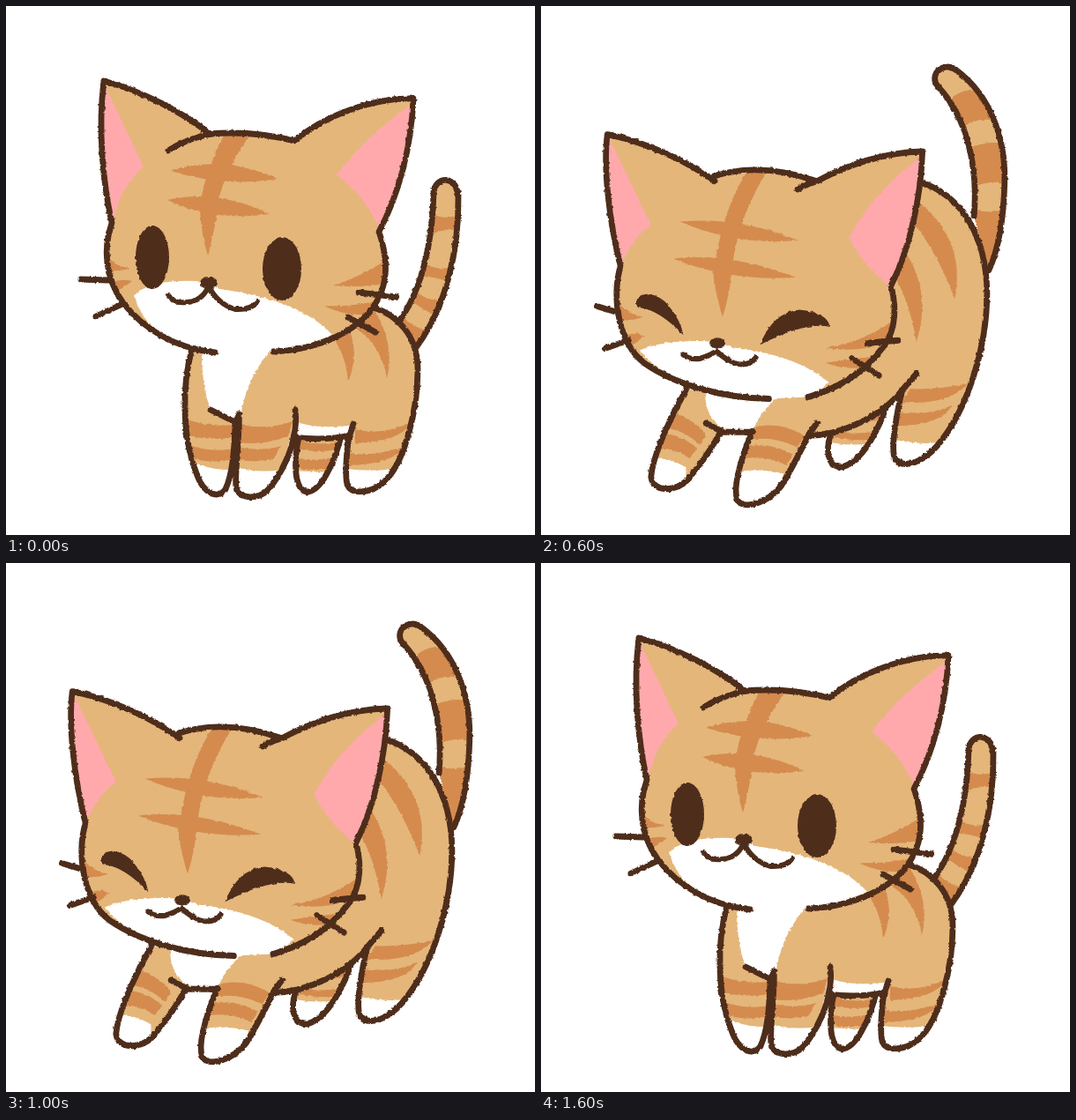
An HTML page with a canvas that plays this animation: 600x600 px, repeating every 2.1 s.

```html
<!DOCTYPE html>
<html lang="en">
<head>
<meta charset="utf-8">
<title>Stretching kitten</title>
<style>
  html, body { margin: 0; width: 100%; height: 100%; overflow: hidden; background: #fff; }
  canvas { display: block; filter: url(#rough); }
  svg { position: absolute; }
</style>
</head>
<body>
<svg width="0" height="0">
  <filter id="rough" filterUnits="userSpaceOnUse" x="0" y="0" width="600" height="600" color-interpolation-filters="sRGB">
    <feTurbulence type="fractalNoise" baseFrequency=".25" numOctaves="2" seed="4"/>
    <feDisplacementMap in="SourceGraphic" scale="3" xChannelSelector="R" yChannelSelector="G"/>
  </filter>
</svg>
<canvas id="stage" width="600" height="600"></canvas>
<script>
const ctx = document.getElementById('stage').getContext('2d');
const FUR = '#e4b67a', STRIPE = '#d58b4e', PINK = '#ffa9ac', WHITE = '#fff', INK = '#4e2d1b';

// Subpaths are filled one by one, so crossing stripes leave no holes.
function paint(color, d) {
  ctx.fillStyle = color;
  for (const sub of d.split('Z')) ctx.fill(new Path2D(sub));
}

function line(d, width = 6.8) {
  ctx.strokeStyle = INK;
  ctx.lineWidth = width;
  ctx.stroke(new Path2D(d));
}

// Furry shape with markings clipped to it, outlined on top.
function part(d, { stripe = '', white = '', pink = '' }) {
  paint(FUR, d);
  ctx.save();
  ctx.clip(new Path2D(d));
  paint(STRIPE, stripe);
  paint(WHITE, white);
  paint(PINK, pink);
  ctx.restore();
  line(d);
}

function oval(x, y, rx, ry) {
  ctx.beginPath();
  ctx.ellipse(x, y, rx, ry, 0, 0, 7);
  ctx.fillStyle = INK;
  ctx.fill();
}

function stand() {
  part('M446 357C470 325 484 270 485 212C487 192 511 192 513 215C514 275 500 340 466 386', {
    stripe: 'M482 235Q498 244 514 236L512 255Q497 251 479 261ZM476 293Q490 300 507 296L502 313Q486 306 470 307Z' +
      'M462 321Q476 336 497 333L489 351Q472 345 457 332ZM449 350Q460 366 482 368L466 388L445 358Z'
  });
  part('M332 488C326 520 327 548 341 551C356 552 372 520 380 488', {
    stripe: 'M328 491Q350 500 382 494L376 503Q350 508 328 501ZM327 512Q350 517 372 512L366 525Q345 528 327 523Z',
    white: 'M325 527L370 529V560H325Z'
  });
  part('M211 389C199 430 200 490 216 530C224 554 241 560 249 548C257 530 259 505 260 474L264 463' +
    'C265 495 259 530 261 546C265 561 287 559 297 549C315 528 325 500 326 489C350 492 372 491 389 487' +
    'C386 510 384 530 387 543C392 555 412 552 425 543C455 520 467 450 467 412C467 375 445 350 414 341', {
    stripe: 'M203 468Q228 478 259 475V489Q230 494 204 486ZM206 497Q230 507 258 502V514Q232 520 209 512Z' +
      'M264 474Q295 482 325 471L320 488Q290 499 264 495ZM263 500Q288 506 312 499L304 513Q280 519 262 514Z' +
      'M396 480Q425 488 460 472Q448 494 396 496ZM388 507Q415 512 454 499Q438 520 388 521Z' +
      'M362 366Q385 388 388 426Q402 395 387 360ZM388 360Q425 380 432 422Q442 385 417 343Z',
    white: 'M222 388C222 420 226 445 233 458L266 472C268 440 282 410 303 388Z' +
      'M326 470Q345 480 390 476V500H320ZM205 513Q230 528 260 526V565H205Z' +
      'M260 524Q285 530 318 526V565H255ZM380 524Q415 530 455 523V560H380Z'
  });
  line('M232 458L262 473M264 463V480M328 458Q330 474 326 489M394 474L389 490');
  part('M237 393C190 388 155 365 133 337C112 308 110 275 120 246C110 200 104 140 111 85' +
    'C155 97 200 120 231 145Q280 141 327 153C360 125 415 104 462 105C460 160 445 215 423 256' +
    'C438 300 430 330 405 355C380 378 340 391 303 392', {
    stripe: 'M248 145Q222 195 220 232Q222 262 229 283Q238 250 240 225Q248 185 278 145Z' +
      'M187 187Q245 168 308 196Q245 206 187 187ZM183 220Q240 207 299 236Q235 245 183 220Z' +
      'M117 286Q125 296 141 297Q128 302 110 300ZM112 317Q128 308 143 312Q132 321 120 326Z' +
      'M371 317Q400 308 432 288V315Q395 320 371 317ZM360 340Q395 342 430 332L412 350Q385 352 360 340Z',
    white: 'M145 328Q165 310 215 312Q235 314 243 321Q335 334 370 373L300 400H235Q160 380 145 328Z',
    pink: 'M112 90L156 182Q130 205 121 246C110 200 106 130 112 90ZM459 112Q405 150 375 192Q405 212 424 254C442 215 457 165 459 112Z'
  });
  paint(WHITE, 'M243 386H297V396H243Z');
  line('M184 164Q205 150 234 145');
  oval(166, 285, 19, 36);
  oval(313, 298, 22, 36);
  oval(230, 314, 10, 7);
  line('M184 328Q190 338 205 336Q222 335 230 318Q240 338 260 344Q277 345 285 336', 6);
  line('M85 310L116 311M102 352L130 339M400 325L443 330M388 353L419 370');
}

function lean() {
  part('M487 300C500 260 511 200 507 142C508 117 532 117 538 138C551 200 542 285 512 342', {
    stripe: 'M507 170Q528 159 548 167V207Q528 200 505 208ZM504 229Q522 240 540 234L535 266Q515 254 498 262Z' +
      'M493 283Q508 296 527 293L517 320Q500 312 486 302Z'
  });
  part('M332 475C326 500 325 528 343 530C365 530 380 500 389 470', {
    stripe: 'M330 477Q358 486 388 477L382 487Q355 490 330 485ZM328 491Q350 496 378 491L371 499Q350 503 328 499Z',
    white: 'M320 505L375 507V540H320Z'
  });
  paint(FUR, 'M173 424H330L300 480L214 464L174 448Z');
  part('M173 424C160 460 145 510 144 538C148 552 168 550 180 538C197 520 213 490 214 462', {
    stripe: 'M167 453Q180 468 207 473Q185 482 162 472ZM158 485Q178 495 204 492L196 503Q175 503 156 496Z',
    white: 'M145 509Q165 517 194 516V555H140Z'
  });
  paint(WHITE, 'M174 420Q188 450 208 460L240 473Q242 440 251 415Z');
  part('M238 474C230 500 220 530 223 552C229 566 256 564 270 550C295 525 307 490 309 476' +
    'C350 481 390 474 421 457C412 485 403 515 409 526C420 536 445 528 458 513' +
    'C483 483 504 410 505 350C505 300 465 254 408 252', {
    stripe: 'M236 483Q262 490 292 485Q270 498 232 497ZM228 510Q256 516 290 512Q265 524 224 523Z' +
      'M422 460Q450 466 474 457Q455 476 416 475ZM413 488Q440 492 468 484Q450 503 410 500Z' +
      'M402 266Q446 300 468 357Q478 303 425 262ZM390 306Q420 330 437 366Q442 312 403 278Z',
    white: 'M310 455Q360 463 423 453L415 465L305 485ZM220 525Q250 532 290 531V570H215ZM405 512Q430 519 465 511V540H400Z'
  });
  line('M205 461L240 475M311 450Q313 462 309 476M427 444L421 458');
  part('M240 425C200 426 150 412 112 388C75 360 65 315 78 284C62 240 54 160 61 123' +
    'C105 133 150 158 174 174Q225 160 290 178C330 158 375 149 418 148C418 205 408 260 391 300' +
    'C400 330 395 350 372 375C355 395 330 410 303 416', {
    stripe: 'M212 172Q186 225 178 280Q180 310 187 332Q199 300 198 270Q203 215 237 172Z' +
      'M143 232Q205 224 262 243Q205 258 143 232ZM137 265Q195 260 254 281Q200 292 137 265Z' +
      'M75 318Q88 330 99 333Q88 338 70 335ZM78 354Q95 346 106 355Q95 362 86 366Z' +
      'M311 354Q350 350 396 317V338Q355 362 311 354ZM314 375Q345 376 386 360L370 383Q340 388 314 375Z',
    white: 'M101 377Q120 365 150 366Q185 356 204 367Q300 370 328 402L303 420L240 430Q150 425 101 377Z',
    pink: 'M64 128L112 229Q90 250 81 282C64 240 56 170 64 128ZM415 154Q370 195 340 258Q360 285 388 300C407 260 415 205 415 154Z'
  });
  line('M172 173L181 183M269 190Q277 184 290 178');
  oval(129, 328, 19, 36);
  oval(274, 343, 21, 38);
  oval(187, 361, 10, 7);
  line('M149 370Q155 379 168 378Q182 376 187 367Q196 379 213 383Q235 385 243 374', 6);
  line('M39 321L74 328M47 364L78 357M359 359L406 362M347 386L387 403');
}

function crouch() {
  part('M493 245C498 190 485 135 452 101C440 88 458 72 472 82C515 112 530 165 528 210C527 250 520 285 510 305', {
    stripe: 'M466 115Q478 103 502 104L514 138Q495 135 481 146ZM488 169Q510 160 530 165L532 209Q512 204 490 213Z' +
      'M490 237Q510 243 530 236L510 306L490 246Z'
  });
  part('M330 485C322 505 325 522 340 524C365 520 385 480 394 452', {
    stripe: 'M345 466Q365 469 394 458L387 470Q365 478 345 466ZM330 480Q350 490 380 484L374 493Q348 496 327 488Z',
    white: 'M320 494Q340 501 372 498V530H315Z'
  });
  paint(FUR, 'M163 438H320L300 482L203 484L170 466Z');
  part('M163 438C145 470 125 510 123 535C126 552 150 552 165 538C180 520 195 500 203 484', {
    stripe: 'M146 463Q168 468 186 487L179 499Q160 482 138 480ZM134 487Q155 486 176 503L167 514Q150 502 129 503Z',
    white: 'M115 514Q140 511 163 524V560H115Z'
  });
  paint(WHITE, 'M185 438Q184 470 206 481L240 484Q246 462 274 442Z');
  part('M239 484C228 510 216 545 222 561C230 572 258 563 272 545C285 525 295 505 303 489' +
    'C345 488 390 465 411 438C404 465 398 500 402 514C412 528 436 517 451 500' +
    'C486 460 508 390 508 330C507 265 478 222 432 207', {
    stripe: 'M243 479Q272 473 299 489L290 502Q268 490 238 493ZM234 501Q260 496 286 510L278 522Q258 511 229 514Z' +
      'M420 437Q450 438 486 431Q465 455 410 452ZM406 462Q440 468 468 455Q455 478 403 478Z' +
      'M417 244Q450 282 471 337Q484 272 431 230ZM398 306Q418 333 427 385Q446 328 411 279Z',
    white: 'M212 530Q245 524 275 531L262 575H212ZM398 492Q425 500 460 496V530H395Z'
  });
  line('M186 475L205 485H240M303 489L313 475M411 438L427 420');
  part('M258 448C210 447 155 435 115 408C85 385 78 335 88 300C75 250 68 190 73 154' +
    'C120 163 165 185 190 202Q245 183 313 206C350 187 390 174 434 173C432 225 420 280 398 322' +
    'C407 355 400 380 385 395C365 420 335 437 303 446', {
    stripe: 'M234 194Q205 235 194 310Q198 335 205 357Q214 330 216 300Q225 240 257 194Z' +
      'M156 251Q225 245 292 272Q220 278 156 251ZM148 292Q215 285 289 313Q215 318 148 292Z' +
      'M88 344Q100 355 114 357Q100 362 82 360ZM88 381Q105 371 115 378Q105 386 97 391Z' +
      'M323 391Q360 388 402 360L398 384Q360 398 323 391ZM323 408Q350 404 388 400L374 412Q345 417 323 408Z',
    white: 'M110 394Q140 382 185 384Q205 384 217 391Q290 399 327 430L300 450L258 453Q160 450 110 394Z',
    pink: 'M76 160L123 255Q100 270 89 300C76 260 70 200 76 160ZM431 180Q380 215 350 268Q365 300 396 322C417 280 430 230 431 180Z'
  });
  line('M188 201L196 206M291 215Q300 210 313 206');
  paint(INK, 'M106 342C106 328 128 328 142 343Q157 360 160 377Q133 350 112 347Q106 347 106 342Z' +
    'M248 388Q262 352 293 349Q325 352 328 368Q300 362 248 388Z');
  oval(199, 386, 9, 6);
  line('M160 399Q168 405 180 403Q190 400 198 395Q209 405 220 409Q236 412 243 402', 6);
  line('M61 345L85 352M70 392L97 383M371 386L406 383M353 403L384 422');
}

// The crouch, slightly stretched upwards from the feet.
function bob() {
  ctx.translate(300, 570);
  ctx.scale(.99, 1.02);
  ctx.translate(-300, -570);
  crouch();
}

const LOOP = 2100, STEP = 200;
const poses = [stand, lean, crouch, bob, crouch, bob, crouch, lean, stand];
let shown;

function tick(now) {
  const step = Math.floor(now % LOOP / STEP);
  const pose = poses[Math.min(step, poses.length - 1)];
  if (pose !== shown) {
    shown = pose;
    ctx.fillStyle = WHITE;
    ctx.fillRect(0, 0, 600, 600);
    ctx.save();
    ctx.lineCap = ctx.lineJoin = 'round';
    pose();
    ctx.restore();
  }
  requestAnimationFrame(tick);
}
tick(0);
</script>
</body>
</html>
```
